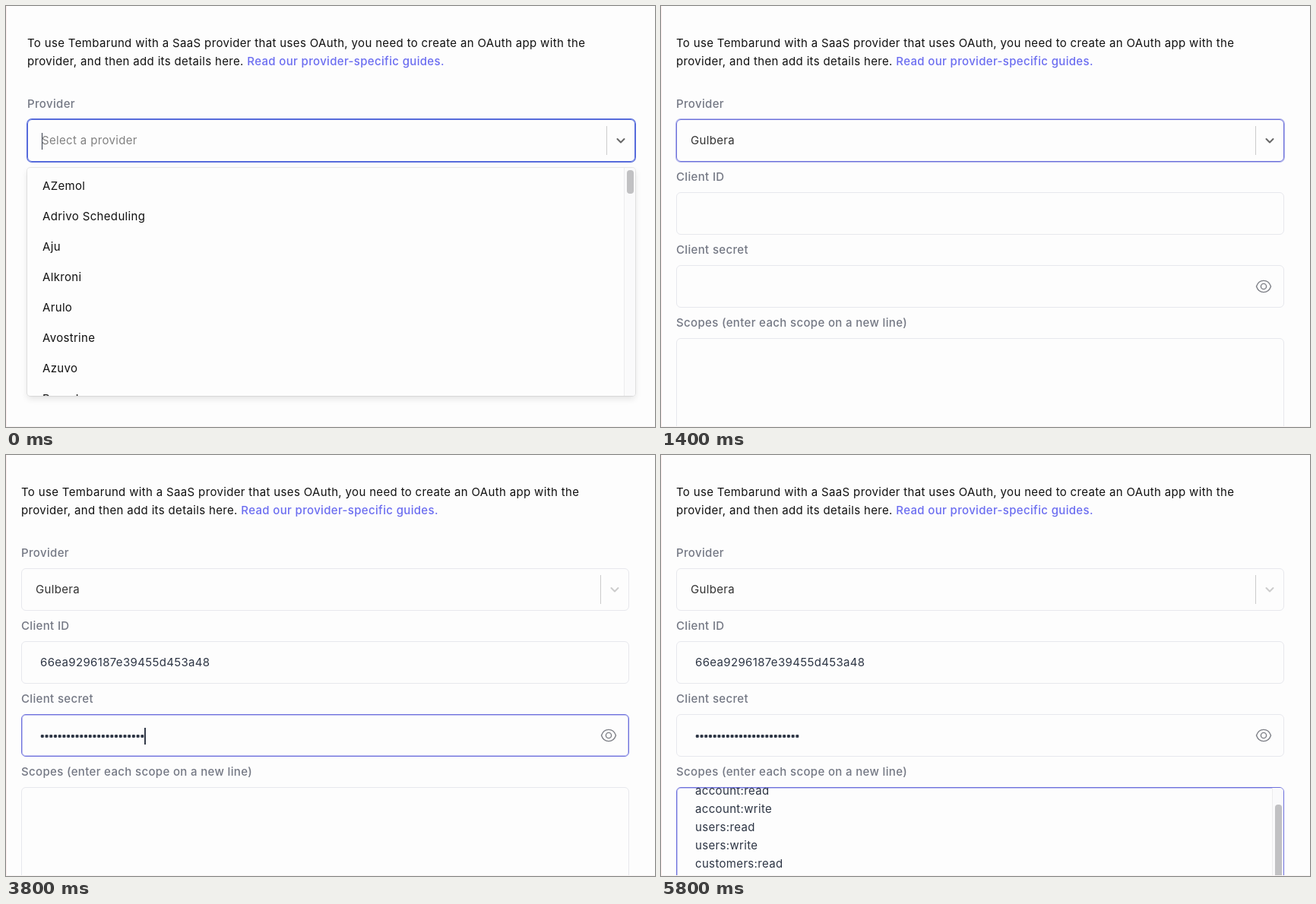
Write an HTML page that moves like this. It is 854x554 px and loops after 6.4 s.

```html
<!DOCTYPE html>
<html lang="en">
<head>
<meta charset="utf-8">
<title>Provider form</title>
<style>
  html, body { margin: 0; width: 100%; height: 100%; overflow: hidden; background: #fdfdfd; }
  body { font: 15px/24px Inter, "Open Sans", sans-serif; letter-spacing: .34px; color: #111; }
  #stage { position: absolute; left: 0; top: 0; width: 854px; height: 554px; overflow: hidden;
    box-sizing: border-box; border-left: 1px solid #fdeeed; border-bottom: 1px solid #f8f3f2; }
  #form { position: absolute; left: 27px; top: 0; width: 800px; height: 554px; }
  #form.scrolled { left: 19px; }
  #form * { box-sizing: border-box; white-space: pre; }
  #form > * { position: absolute; }
  #intro { top: 37px; }
  #intro b { font-weight: 500; color: #6b6df0; }
  label { font-weight: 500; color: #747884; }
  .field { left: 0; width: 800px; height: 56px; border: 1px solid #e7e8ed; border-radius: 6px;
    padding: 15px 24px; color: #2d3544; overflow: hidden; }
  .field.focus { border-color: #6d70dc; box-shadow: inset 0 0 0 1px #c3c4f1; }
  #provider { padding-left: 18px; color: #333; }
  #provider.focus { border-color: #6b70da; box-shadow: 0 0 0 1px #b3b5ec; }
  #provider.open { border-color: #566bdb; box-shadow: 0 0 0 1px #566bdb; }
  #placeholder { position: absolute; left: 18px; color: #808080; }
  .caret { display: inline-block; width: 1.3px; height: 22px; margin-right: -1.3px;
    vertical-align: middle; background: #333a48; }
  #divider { left: 762px; top: 158px; width: 1px; height: 38px; background: #ccc; }
  svg { fill: none; stroke-linecap: round; stroke-linejoin: round; }
  #chevron { left: 775px; top: 171px; stroke: #ccc; stroke-width: 2; }
  #chevron.dark { stroke: #666; }
  #eye { left: 762px; top: 358px; stroke: #7d7f86; stroke-width: 1.4; }
  .dots { display: inline-block; width: 137.3px; height: 24px; vertical-align: middle;
    background: radial-gradient(circle at 2.8px 12px, #2d3544 1.9px, transparent 2.5px) 0 0 / 5.72px 24px; }
  #save { top: 421px; width: 800px; height: 56px; border-radius: 6px; background: #98a2b7;
    color: #f7f8fa; line-height: 56px; text-align: center; }
  #scopes { top: 437px; height: 150px; padding: 0 24px; }
  #lines { position: absolute; top: 16px; }
  .track { position: absolute; right: 0; top: 0; bottom: 0; width: 15px; background: #fafafb; border-left: 1px solid #ececee; }
  .thumb { position: absolute; left: 3px; width: 9px; border-radius: 4px; background: #c1c1c3; }
  #menu { left: 0; top: 213px; width: 800px; max-height: 300px; padding: 4px 0; overflow: hidden;
    border-radius: 4px; background: #fdfdfd; box-shadow: 0 0 0 1px rgba(0,0,0,.08), 0 4px 9px rgba(0,0,0,.1); }
  #menu .option { height: 40px; padding: 8px 20px; }
</style>
</head>
<body>
<div id="stage">
  <div id="form">
    <div id="intro">To use Tembarund with a SaaS provider that uses OAuth, you need to create an OAuth app with the
provider, and then add its details here. <b>Read our provider-specific guides.</b></div>
    <label style="top:117px">Provider</label>
    <div id="provider" class="field" style="top:149px"></div>
    <div id="divider"></div>
    <svg id="chevron" width="12" height="12"><path d="M1.5 4 6 8.5 10.5 4"/></svg>
    <label style="top:213px">Client ID</label>
    <div id="clientId" class="field" style="top:245px"></div>
    <label style="top:309px">Client secret</label>
    <div id="secret" class="field" style="top:341px"></div>
    <svg id="eye" width="22" height="22">
      <path d="M1.5 11C5 .8 17 .8 20.5 11 17 21.2 5 21.2 1.5 11Z"/><circle cx="11" cy="11" r="3.6"/>
    </svg>
    <div id="save">Save changes</div>
    <label id="scopesLabel" style="top:405px">Scopes (enter each scope on a new line)</label>
    <div id="scopes" class="field"></div>
    <div id="menu"></div>
  </div>
</div>
<script>
const LOOP = 6400;
const CHOSEN = "Gulbera";
const CATALOG_SIZE = 70;
const providers = [
  "AZemol", "Adrivo Scheduling", "Aju", "Alkroni", "Arulo", "Avostrine", "Azuvo", "Bregulo",
  "Cogusta", "Fargumi", CHOSEN, "Gumaril", "Gusoley", "Guvento", "Miragul", "Tregunda"
];
const scopeLines = ["account:read", "account:write", "users:read", "users:write", "customers:read"];
const clientId = "66ea9296187e39455d453a48";
const caret = '<span class="caret"></span>';

const $ = id => document.getElementById(id);
const show = (id, visible) => { $(id).style.display = visible ? "" : "none"; };

// Last value whose start time has passed.
const at = (t, steps) => steps.filter(([start]) => t >= start).pop()[1];

function menuHtml(query) {
  const matches = providers.filter(name => name.toLowerCase().includes(query));
  const count = query ? matches.length : CATALOG_SIZE;
  const options = matches.slice(0, 8).map(name => `<div class="option">${name}</div>`).join("");
  if (count < 8) return options;
  const thumb = 294 * 300 / (count * 40 + 8);
  return `${options}<div class="track"><div class="thumb" style="top:3px;height:${thumb}px"></div></div>`;
}

function scopesHtml(pasted, caretOn) {
  if (!pasted) return `<div id="lines">${caretOn ? caret : ""}</div>`;
  return `<div id="lines" style="margin-top:-24px">${scopeLines.join("\n")}</div>
    <div class="track"><div class="thumb" style="top:22px;height:112px"></div></div>`;
}

function render(t) {
  const open = t < 1400;
  const query = at(t, [[0, ""], [200, "g"], [400, "gu"], [800, "gul"], [1000, "gulb"]]);
  const focus = at(t, [[0, "provider"], [3000, "clientId"], [3600, "secret"], [4400, "scopes"]]);

  $("form").classList.toggle("scrolled", !open);
  for (const id of ["provider", "clientId", "secret", "scopes"])
    $(id).classList.toggle("focus", id === focus);
  $("provider").classList.toggle("open", open);
  $("chevron").classList.toggle("dark", focus === "provider");
  show("menu", open);
  show("save", open);
  show("scopes", !open);
  show("scopesLabel", !open);

  const placeholder = query ? "" : '<span id="placeholder">Select a provider</span>';
  $("provider").innerHTML = open ? placeholder + query + caret : CHOSEN;
  $("menu").innerHTML = open ? menuHtml(query) : "";
  $("clientId").innerHTML = (t >= 3200 ? clientId : "") + (focus === "clientId" ? caret : "");
  $("secret").innerHTML = (t >= 3800 ? '<span class="dots"></span>' : "") + (focus === "secret" ? caret : "");
  $("scopes").innerHTML = scopesHtml(t >= 5200, focus === "scopes" && t < 4800);
}

let lastTick = -1;
function frame() {
  const tick = Math.floor(performance.now() % LOOP / 200);
  if (tick !== lastTick) render(tick * 200);
  lastTick = tick;
  requestAnimationFrame(frame);
}
frame();
</script>
</body>
</html>
```
